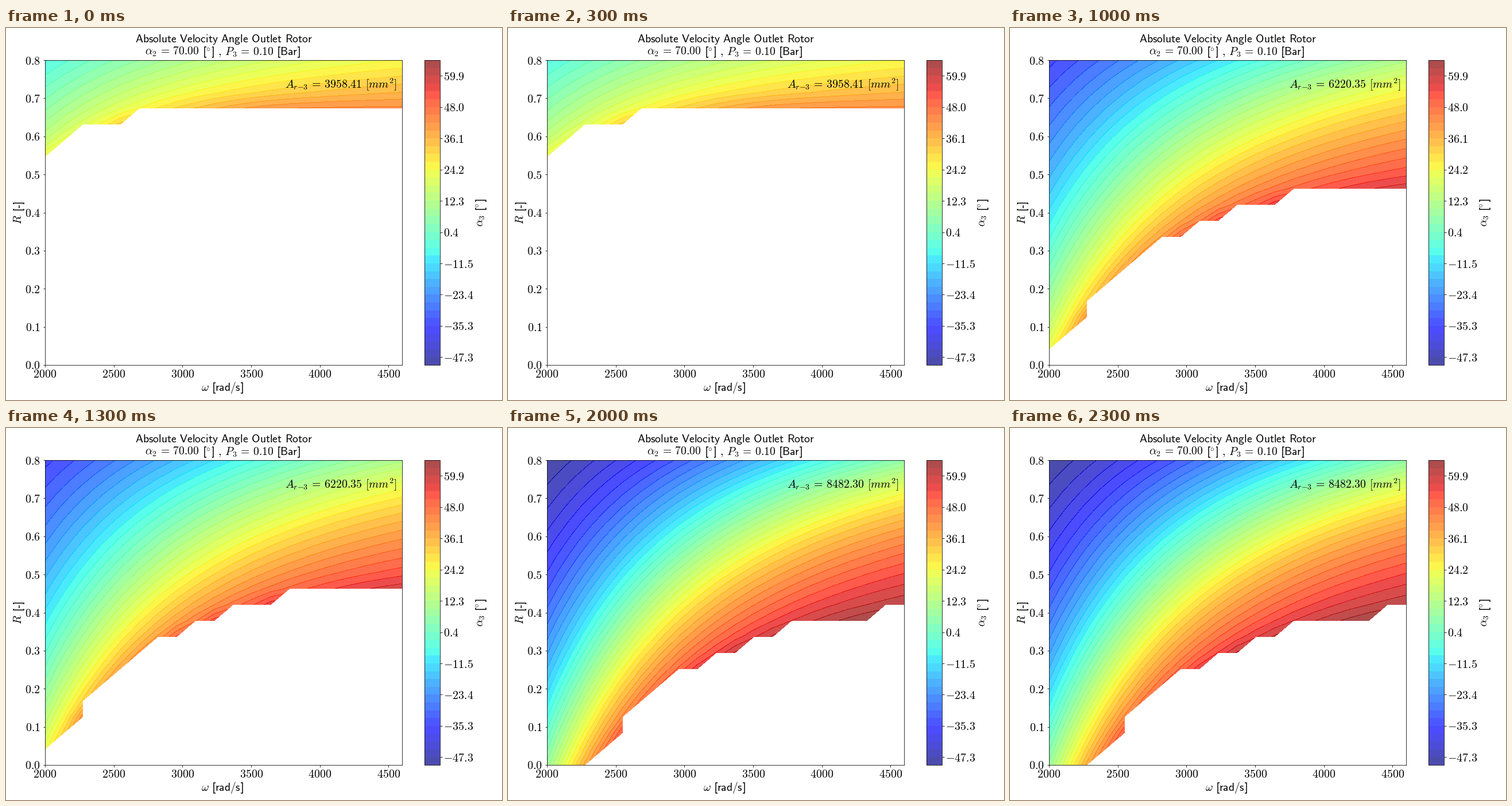
Recreate the animation shown at these times as a matplotlib script. Size 864 by 648 pixels, loop 2500 ms.

```python
import numpy as np
import matplotlib.pyplot as plt
from matplotlib.animation import FuncAnimation
from matplotlib.lines import Line2D
from matplotlib.mathtext import MathTextParser

W, H = 864, 648
plt.rcParams.update({"mathtext.fontset": "cm", "font.size": 20})

SIZE = 19.6
GAP = r"\hspace{0.38}"
EQUALS = r"\hspace{0.18}=\hspace{0.18}"
CIRCLE = r"{}^{\circ}"

# Sans signs that the math font lacks: advance and pen path in ems
STROKES = {
    "[": (0.289, [(0.266, 0.712), (0.13, 0.712), (0.13, -0.212), (0.266, -0.212)]),
    "]": (0.289, [(0.023, 0.712), (0.159, 0.712), (0.159, -0.212), (0.023, -0.212)]),
    "-": (0.333, [(0.011, 0.225), (0.277, 0.225)]),
}

LEVELS = -50.232 + 2.977 * np.arange(40)
HEIGHTS = np.arange(14, 31, 4)      # blade heights in mm
RADIUS = 45                         # outlet radius in mm

# Velocities are relative to the ideal jet speed
INLET = 0.47422
TIP = np.sqrt(0.3658 / INLET)
FLOW = np.sqrt(0.0543 / INLET) * 30

omega = np.linspace(2000, 4600, 20)
reaction = np.linspace(0, 0.8, 20)
grid_w, grid_r = np.meshgrid(omega, reaction)
parser = MathTextParser("path")


def outlet_angle(height):
    """Absolute outlet angle in degrees, masked where no flow is possible."""
    speed = grid_w / 4600
    blade = TIP * speed
    axial = FLOW / height
    swirl2 = 1 + blade**2 - axial**2 - speed * np.sqrt(1 - grid_r) / INLET
    swirl = np.ma.sqrt(np.ma.masked_less(swirl2, 0))
    angle = np.degrees(np.ma.arctan2(blade - swirl, axial))
    return np.ma.clip(angle, LEVELS[0], LEVELS[-1])


def sans(text):
    return r"\mathsf{" + text.replace(" ", GAP) + "}"


def put(x, y, text, size=SIZE, **style):
    """Place math text with its baseline at pixel (x, y) from the top left."""
    return fig.text(x / W, 1 - y / H, f"${text}$", fontsize=size,
                    va="baseline", rotation_mode="anchor", **style)


def advance(text):
    return parser.parse(f"${text}$", dpi=720)[0] / 10 * SIZE / 20


def write(x, y, parts, angle=0):
    """Set math parts and stroked signs one after another from (x, y)."""
    cos, sin = np.cos(np.radians(angle)), np.sin(np.radians(angle))
    for part in parts:
        if part in STROKES:
            width, path = STROKES[part]
            width *= SIZE
            u, v = SIZE * np.array(path).T
            px = x + u * cos - v * sin
            py = y - u * sin - v * cos
            fig.add_artist(Line2D(px / W, 1 - py / H, color="black", lw=1.5,
                                  solid_capstyle="butt",
                                  solid_joinstyle="miter"))
        else:
            # Rendered math has a margin of one pixel
            put(x - cos, y + sin, part, ha="left", rotation=angle)
            width = advance(part)
        x += width * cos
        y -= width * sin


def pixel_axes(left, top, right, bottom):
    return fig.add_axes([left / W, 1 - bottom / H,
                         (right - left) / W, (bottom - top) / H])


fig = plt.figure(figsize=(W / 72, H / 72), dpi=72, facecolor="white")
ax = pixel_axes(68, 56, 690.4, 587)
cax = pixel_axes(729.3, 56, 755.85, 587)

scenes = []
for height in HEIGHTS:
    # Overlapping hard edges give the thin darker lines between bands
    fill = ax.contourf(omega, reaction, outlet_angle(height), LEVELS,
                       cmap="jet", alpha=0.7, antialiased=False)
    area = 2 * np.pi * RADIUS * height
    label = put(485.5, 105, r"A_{r{-}3}" + EQUALS + sans(f"{area:.2f} ")
                + "[mm^2]", size=19.8)
    scenes.append((fill, label))

ax.set(xlim=(2000, 4600), ylim=(0, 0.8))
xticks = np.arange(2000, 4501, 500)
yticks = np.arange(9) / 10
ax.set_xticks(xticks, [f"${x}$" for x in xticks])
ax.set_yticks(yticks, [f"${y:.1f}$" for y in yticks])
ax.tick_params(axis="y", pad=4.5)

bar = fig.colorbar(scenes[0][0], cax=cax)
ticks = LEVELS[1::4]
bar.set_ticks(ticks, labels=[f"${t:.1f}$" for t in ticks])
bar.minorticks_off()
cax.tick_params(pad=2.8)

put(379, 25, sans("Absolute Velocity Angle Outlet Rotor"), ha="center")
write(243.3, 47, [r"\alpha_2" + EQUALS + sans("70.00 "), "[", CIRCLE, "]",
                  GAP + "{,}" + GAP + "P_3" + EQUALS + sans("0.10 "),
                  "[", sans("Bar"), "]"])
write(340.5, 632, [r"\omega" + GAP, "[", sans("rad/s"), "]"])
write(831.5, 345.3, [r"\alpha_3" + GAP, "[", CIRCLE, "]"], angle=90)
write(27, 341.5, ["R" + GAP, "[", "-", "]"], angle=90)


def draw(step):
    for i, scene in enumerate(scenes):
        for artist in scene:
            artist.set_visible(i == step)
    return [artist for scene in scenes for artist in scene]


anim = FuncAnimation(fig, draw, frames=len(scenes), interval=500,
                     repeat=True, repeat_delay=0, blit=False)
plt.show()
```
